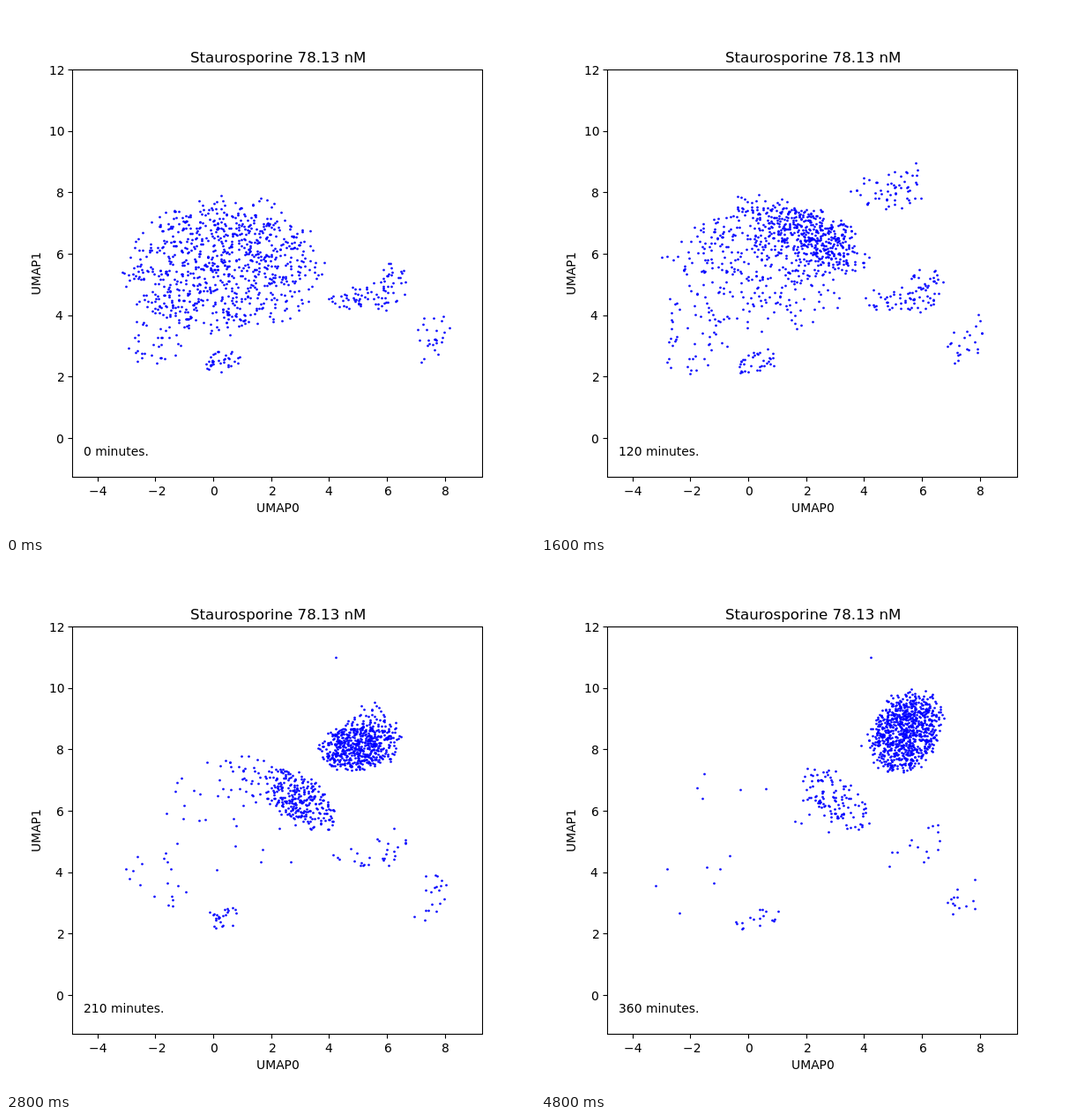
An HTML page with a canvas for the animation above (5.2 s loop, 600 by 600 pixels).

```html
<!DOCTYPE html>
<html lang="en">
<head>
<meta charset="utf-8">
<title>Cell state scatter</title>
<style>
  html, body { margin: 0; width: 100%; height: 100%; overflow: hidden; background: #fff; }
  canvas { display: block; }
</style>
</head>
<body>
<canvas id="plot" width="600" height="600"></canvas>
<script>
const ctx = document.getElementById('plot').getContext('2d');
const STEP_MS = 400, STEPS = 13, MINUTES_PER_STEP = 30;
const toX = v => 235.6 + 32.83 * v;
const toY = v => 490.3 - 34.82 * v;

// Regions are ellipses: x, y, rx, ry, tilt in degrees.
const DOME = [248, 294, 103, 73, 0];
const CREST = [285, 250, 62, 22, 27];
const SHOULDER = [335, 269, 45, 24, 42];
const ENTRY = [397, 212, 41, 23, 8];
const COLONY = [415, 190, 46, 36, -60];

// Share: part of the cells that never reach the colony.
const homes = [
  { region: DOME, count: 815, share: 0.12 },
  { region: [172, 372, 38, 45, 15], count: 50, share: 0.15 },
  { region: [244, 404, 24, 13, -15], count: 35, share: 0.3 },
  { region: [398, 333, 30, 14, 0], count: 40, share: 0.15 },
  { region: [436, 318, 18, 28, 15], count: 42, share: 0.2 },
  { region: [483, 378, 18, 34, 20], count: 25, share: 0.6 }
];

function random(seed) {
  return () => {
    seed = (seed + 0x6D2B79F5) | 0;
    let h = Math.imul(seed ^ (seed >>> 15), 1 | seed);
    h = (h + Math.imul(h ^ (h >>> 7), 61 | h)) ^ h;
    return ((h ^ (h >>> 14)) >>> 0) / 4294967296;
  };
}

// Death times follow a logistic curve around step 6.3.
const next = random(7);
const cells = homes.flatMap(({ region, count, share }) =>
  Array.from({ length: count }, () => {
    const u = 0.001 + 0.998 * next();
    return {
      home: region,
      death: 6.3 + 0.9 * Math.log(u / (1 - u)),
      survives: next() < share,
      dormant: next() < 0.015
    };
  }));

function mix(from, to, part) {
  const p = Math.min(1, Math.max(0, part));
  return from.map((value, i) => value + (to[i] - value) * p);
}

// Age counts steps since death; living cells have a negative age.
function regionAt(cell, age) {
  if (age >= 0) return mix(ENTRY, COLONY, age / 5);
  if (cell.home !== DOME || cell.dormant) return cell.home;
  return age < -2 ? mix(DOME, CREST, (age + 3.5) / 1.5)
                  : mix(CREST, SHOULDER, (age + 2) / 1.3);
}

function dot(x, y) {
  ctx.beginPath();
  ctx.arc(Math.floor(x) + 0.5, Math.floor(y) + 0.5, 1.35, 0, 2 * Math.PI);
  ctx.fill();
}

function drawCell(cell, index, step) {
  let age = step - cell.death;
  if (cell.survives || cell.dormant) age = Math.min(age, -0.1);
  const [x, y, rx, ry, tilt] = regionAt(cell, age);
  // Living cells wander at every step, cells in the colony keep their place.
  const roll = random(index * 977 + (age < 0 ? step * 31 : 0));
  const radius = roll() ** 0.55 * (0.85 + 0.3 * roll());
  const angle = 2 * Math.PI * roll();
  const u = rx * radius * Math.cos(angle), v = ry * radius * Math.sin(angle);
  const cos = Math.cos(tilt * Math.PI / 180), sin = Math.sin(tilt * Math.PI / 180);
  dot(x + u * cos - v * sin, y + u * sin + v * cos);
}

// Anchor 0 is left, 0.5 centre, 1 right; the pen starts on a whole pixel.
function text(content, x, y, anchor = 0, size = 13.89) {
  ctx.font = `${size}px "DejaVu Sans", sans-serif`;
  const box = ctx.measureText(content);
  const inkWidth = box.actualBoundingBoxLeft + box.actualBoundingBoxRight;
  ctx.fillText(content, Math.round(x - anchor * inkWidth), Math.round(y));
}

function line(x1, y1, x2, y2) {
  ctx.beginPath();
  ctx.moveTo(x1, y1);
  ctx.lineTo(x2, y2);
  ctx.stroke();
}

function drawAxes() {
  ctx.strokeStyle = ctx.fillStyle = '#000';
  ctx.lineWidth = 1.11;
  ctx.strokeRect(75.5, 72.5, 465, 462);
  for (let v = -4; v <= 8; v += 2) {
    const x = Math.floor(toX(v)) + 0.5;
    line(x, 534.5, x, 539.5);
    text(String(v).replace('-', '\u2212'), toX(v), 555, 0.5);
  }
  for (let v = 0; v <= 12; v += 2) {
    const y = Math.floor(toY(v)) + 0.5;
    line(70.5, y, 75.5, y);
    text(String(v), 65.3, toY(v) + 5.2, 1);
  }
  text('Staurosporine 78.13 nM', 307.5, 64, 0.5, 16.67);
  text('UMAP0', 307.5, 574, 0.5);
  ctx.save();
  ctx.translate(39, 305);
  ctx.rotate(-Math.PI / 2);
  text('UMAP1', 0, 0, 0.5);
  ctx.restore();
}

let shownStep = -1;
function render(now) {
  const step = Math.floor(now / STEP_MS) % STEPS;
  if (step !== shownStep) {
    shownStep = step;
    ctx.fillStyle = '#fff';
    ctx.fillRect(0, 0, 600, 600);
    ctx.fillStyle = '#00f';
    cells.forEach((cell, index) => drawCell(cell, index, step));
    if (step >= 5) dot(374, 107);
    drawAxes();
    text(`${step * MINUTES_PER_STEP} minutes.`, 88, 510);
  }
  requestAnimationFrame(render);
}
render(performance.now());
</script>
</body>
</html>
```
